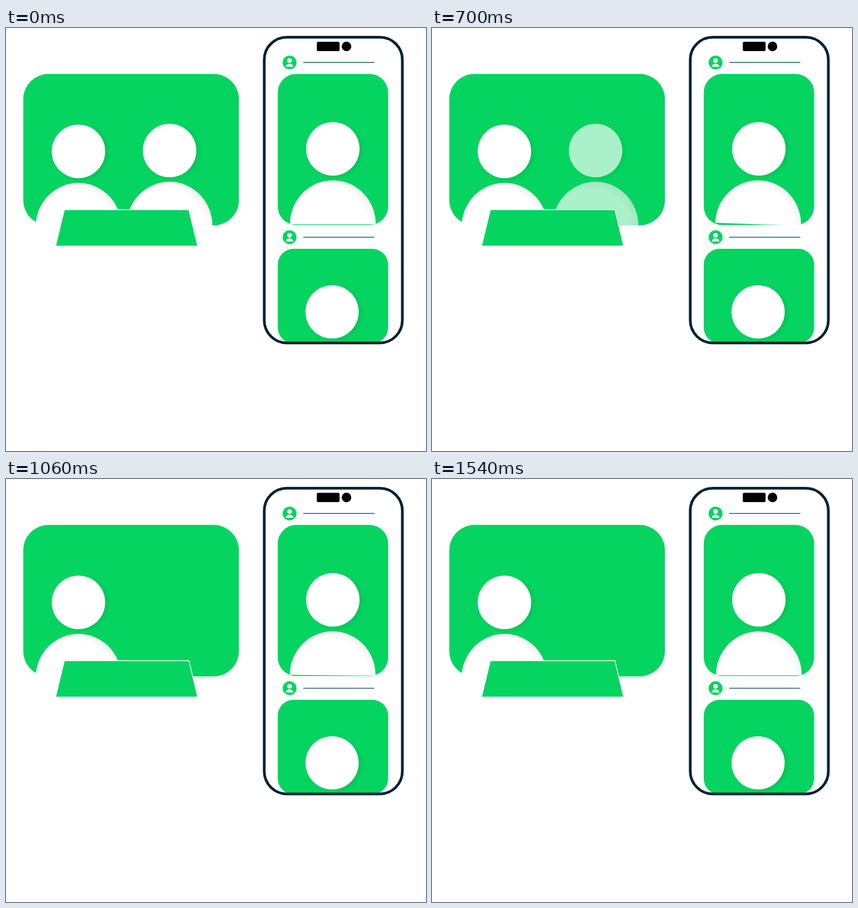
These frames come from a looping animation (746 px wide and 751 px high, 2 s). An HTML page:

```html
<!DOCTYPE html>
<html lang="en">
<head>
<meta charset="utf-8">
<style>
  html, body { margin: 0; width: 100%; height: 100%; overflow: hidden; background: #fff; }
  svg { display: block; width: 746px; height: 751px; }
  .green { fill: #05d460; }
  .head { fill: #fff; filter: drop-shadow(4px 2px 3px rgba(0, 0, 0, .09)); }
  .body { fill: url(#shade); }
</style>
</head>
<body>
<svg viewBox="0 0 746 751">
  <defs>
    <radialGradient id="shade" gradientUnits="userSpaceOnUse" cx="-7" cy="5" r="88">
      <stop offset=".8" stop-color="#fff"/>
      <stop offset="1" stop-color="#efefef"/>
    </radialGradient>
    <path id="torso" class="body" d="M-76.2 0A76.2 78 0 0 1 76.2 0Z"/>
    <g id="contact">
      <circle class="green" r="12.3"/>
      <g fill="#fff">
        <circle cy="-3.4" r="4"/>
        <path d="M-6.6 7.6C-6.6 .4 6.6 .4 6.6 7.6Z"/>
      </g>
      <path d="M24.3 0H150.5" stroke="#1b5f6b" stroke-width="1.5"/>
    </g>
  </defs>

  <rect class="green" x="30.7" y="81.5" width="383" height="269" rx="45"/>
  <circle class="head" cx="128.7" cy="219" r="47.5"/>
  <use href="#torso" x="128.8" y="353"/>
  <g id="guest">
    <circle class="head" cx="290.6" cy="217.6" r="47.5"/>
    <use href="#torso" x="290.4" y="351"/>
  </g>
  <path class="green" d="M103.7 322.5H324.8L340.5 387.3H88Z" stroke="#fff" stroke-width="1.4"/>

  <use href="#contact" x="503.7" y="61.2"/>
  <rect class="green" x="482.7" y="81.5" width="196" height="268.3" rx="33"/>
  <circle class="head" cx="580.5" cy="214.5" r="47.5"/>
  <g id="teeter"><use href="#torso" x="580.6" y="348.4"/></g>
  <use href="#contact" x="503.7" y="371.4"/>
  <rect class="green" x="482.7" y="392" width="196" height="168" rx="28"/>
  <circle class="head" cx="579.2" cy="504" r="47.3"/>

  <rect x="458.7" y="16.3" width="245.3" height="542.8" rx="40" fill="none" stroke="#002233" stroke-width="4.8"/>
  <rect x="552" y="24.4" width="40.5" height="16.7" rx="2.5"/>
  <circle cx="604.8" cy="32.7" r="8.5"/>
</svg>
<script>
  const LOOP = 2000, START = 530, FIRST = 580, STEP = 40;
  const guest = document.getElementById('guest');
  const teeter = document.getElementById('teeter');
  const clamp = v => Math.min(1, Math.max(0, v));

  // Tilt right, hold, swing across twice, then settle; each key is [ms, degrees].
  const keys = [[0, 0], [100, 2], [200, 2], [400, -2], [600, 2], [800, -2], [1000, 0]];

  function tilt(ms) {
    let angle = 0;
    for (let i = 1; i < keys.length; i++) {
      const [t0, a0] = keys[i - 1], [t1, a1] = keys[i];
      angle += (a1 - a0) * clamp((ms - t0) / (t1 - t0));
    }
    return angle;
  }

  function draw(now) {
    const t = now % LOOP;
    const ms = t < FIRST ? 0 : FIRST + Math.floor((t - FIRST) / STEP) * STEP - START;
    guest.setAttribute('opacity', 1 - clamp(ms / 500));
    teeter.setAttribute('transform', `rotate(${tilt(ms)} 580.6 309.4)`);
  }

  const origin = performance.now();
  function tick() {
    draw(performance.now() - origin);
    requestAnimationFrame(tick);
  }
  tick();
</script>
</body>
</html>
```
